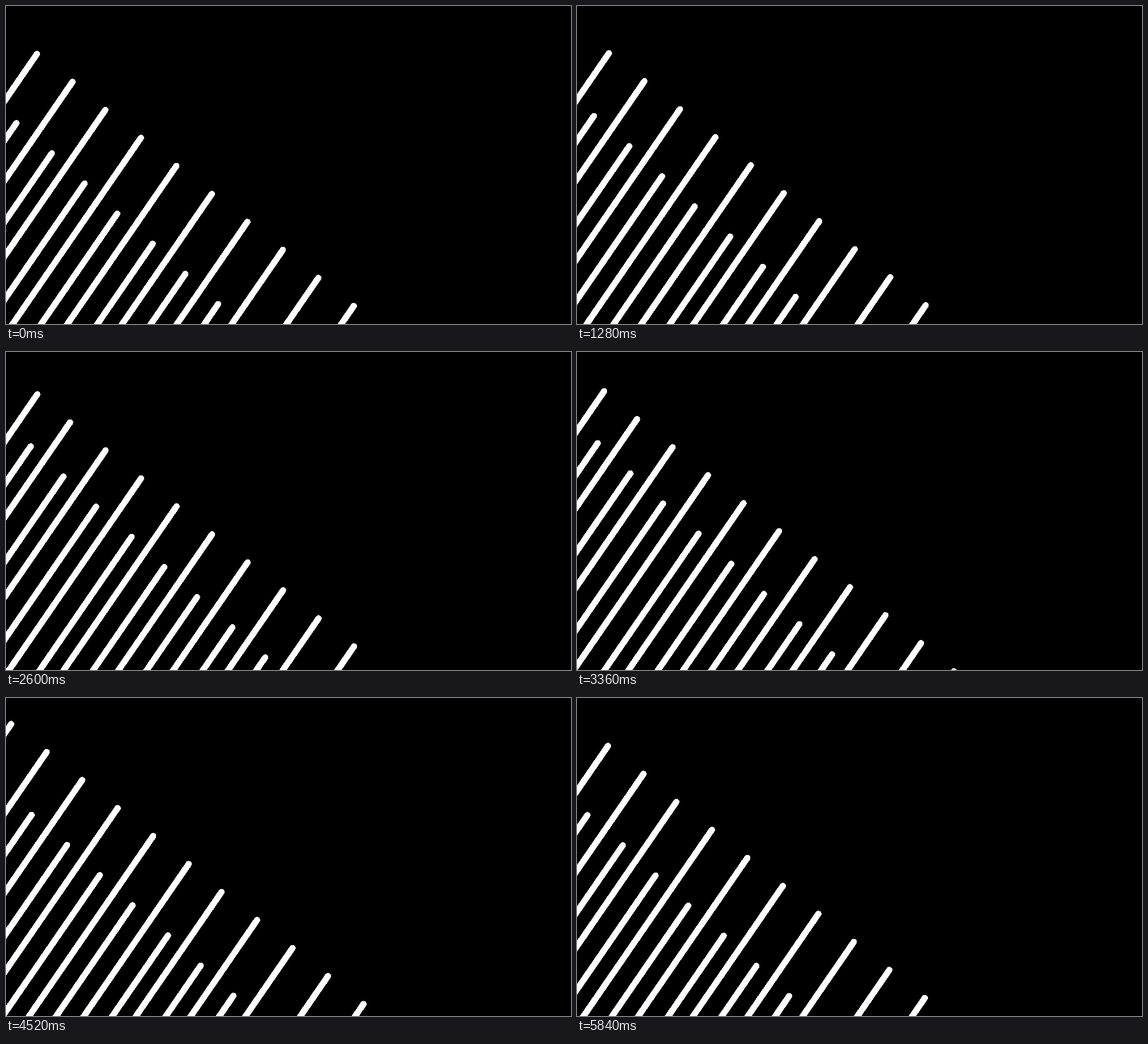
Animation, 998 px wide and 561 px high, one loop 5.92 s. Source, as an HTML page:

```html
<!DOCTYPE html>
<html>
<head>
<meta charset="utf-8">
<style>
  html, body { margin: 0; width: 100%; height: 100%; overflow: hidden; background: #000; }
  svg { display: block; }
  path { fill: none; stroke: #fff; stroke-width: 11; stroke-linecap: round; shape-rendering: crispEdges; }
</style>
</head>
<body>
<svg width="998" height="561"><path/></svg>
<script>
const path = document.querySelector('path');
const LOOP = 5920, FRAME = 40, END = 5840, HALF = 2923;
const TRAVEL_X = 504.5, TRAVEL_Y = 391;
const SLOPE = 1.45, REACH = 700;

// A row of parallel lines; x slips by `slip` once every `every` lines
function row(from, to, x0, y0, dx, dy, slip, every) {
  let d = '';
  for (let i = from; i <= to; i++) {
    const x = x0 + dx * i + slip * Math.floor(i / every);
    const y = y0 + dy * i;
    d += `M${x} ${y}l${-REACH} ${REACH * SLOPE}`;
  }
  return d;
}

const longLines = row(-10, 7, 175.5, 183.3, 62.7, 49.4, -4.7, 9);
const shortLines = row(-6, 8, -97.3, 100.3, 57.8, 53.2, 4.8, 3);
path.setAttribute('d', longLines + shortLines);

function ease(u) {
  const a = u ** 2.03, b = (1 - u) ** 2.03;
  return a / (a + b);
}

const start = performance.now();
function tick() {
  const now = (performance.now() - start) % LOOP;
  const t = Math.min(Math.floor(now / FRAME) * FRAME, END);
  const p = ease(1 - Math.abs(1 - t / HALF));
  path.setAttribute('transform', `translate(${p * TRAVEL_X} ${p * TRAVEL_Y})`);
  requestAnimationFrame(tick);
}
tick();
</script>
</body>
</html>
```
